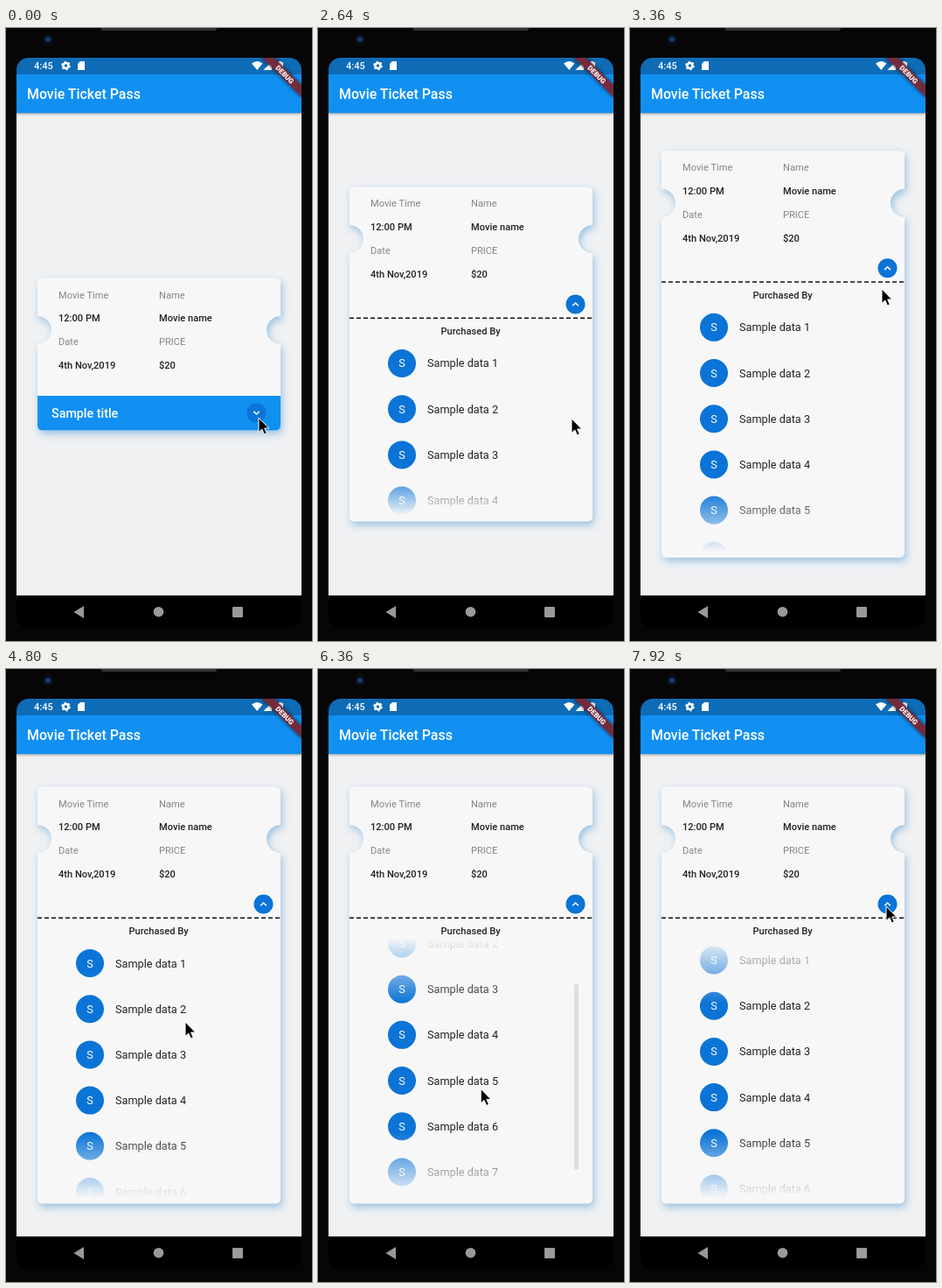
Recreate the animation shown at these times as an HTML page. Size 350 by 700 pixels, loop 8 s.

```html
<!DOCTYPE html>
<html lang="en">
<head>
<meta charset="utf-8">
<title>Movie Ticket Pass</title>
<style>
  html, body { margin: 0; width: 100%; height: 100%; overflow: hidden; background: #060606; }
  svg { display: block; width: 350px; height: 700px; font: 11.1px Roboto, sans-serif; fill: #222; }
  .label { fill: #858585; }
  .strong { font-weight: 500; }
  .white { fill: #fff; }
  .bar { fill: #1190f2; }
  .accent { fill: #0b74d6; }
  .item { font-size: 12.7px; }
  #card { fill: #f7f7f8; filter: drop-shadow(2px 4px 4px #74acdab0); }
</style>
</head>
<body>
<svg viewBox="0 0 350 700">
  <defs>
    <clipPath id="screen"><rect x="12" y="34" width="326" height="651" rx="14"/></clipPath>
    <linearGradient id="fade" x2="0" y2="1">
      <stop id="fadeTop" stop-color="#fff"/>
      <stop offset=".25" stop-color="#fff"/>
      <stop offset=".75" stop-color="#fff"/>
      <stop offset="1" stop-color="#fff" stop-opacity="0"/>
    </linearGradient>
    <mask id="viewport" maskUnits="userSpaceOnUse" x="36" y="0" width="278" height="700">
      <rect id="window" x="36" y="172.5" width="278" fill="url(#fade)"/>
    </mask>
    <g id="toggle">
      <circle class="accent" r="11"/>
      <path d="M-3.3 1.8L0-1.5 3.3 1.8" fill="none" stroke="#fff" stroke-width="1.5"/>
    </g>
  </defs>

  <rect width="350" height="700" fill="#060606"/>
  <rect x="109" y="-2" width="132" height="5" rx="2" fill="#333"/>
  <circle cx="48" cy="13" r="6" fill="#0b1018"/>
  <circle cx="48" cy="13" r="2.8" fill="#16407c"/>

  <g clip-path="url(#screen)">
    <rect x="12" y="34" width="326" height="651" fill="#000"/>
    <rect x="12" y="53" width="326" height="595" fill="#eff1f3"/>
    <rect class="bar" x="12" y="53" width="326" height="44" style="filter:drop-shadow(0 1px 1.5px #0006)"/>
    <rect x="12" y="34" width="326" height="19" fill="#0e6cb7"/>
    <text class="strong white" x="24" y="80.7" font-size="15.9">Movie Ticket Pass</text>

    <g class="white">
      <text class="strong white" x="32" y="47">4:45</text>
      <circle cx="68.5" cy="43" r="3" fill="none" stroke="#fff" stroke-width="2.6"/>
      <circle cx="68.5" cy="43" r="4.6" fill="none" stroke="#fff" stroke-width="1.4" stroke-dasharray="2.4 2.4"/>
      <path d="M85 38H90V48H82V41Z"/>
      <path d="M281 40.5Q287.3 35.5 293.5 40.5L287.3 48Z"/>
      <path d="M304 38.5V48H294.5Z"/>
      <path d="M310 39H312V38H315V39H317V48H310Z"/>
    </g>

    <g transform="translate(338 34) rotate(45)">
      <rect x="-32" y="22.2" width="64" height="9.5" style="filter:drop-shadow(0 0 2.4px #000a)" fill="#762b3c"/>
      <text class="white" y="29.9" font-size="8" font-weight="900" text-anchor="middle">DEBUG</text>
    </g>

    <g id="ticket">
      <path id="card"/>
      <text class="label" x="60" y="23">Movie Time</text>
      <text class="label" x="175" y="23">Name</text>
      <text class="strong" x="60" y="49.7">12:00 PM</text>
      <text class="strong" x="175" y="49.7">Movie name</text>
      <text class="label" x="60" y="76.7">Date</text>
      <text class="label" x="175" y="76.7">PRICE</text>
      <text class="strong" x="60" y="103.5">4th Nov,2019</text>
      <text class="strong" x="175" y="103.5">$20</text>

      <g id="closed">
        <path class="bar" d="M36 134.5H314V168Q314 174 308 174H42Q36 174 36 168Z"/>
        <text class="strong white" x="52" y="159.5" font-size="14.3">Sample title</text>
        <use href="#toggle" transform="translate(286.5 154) rotate(180)"/>
      </g>

      <g id="open">
        <use href="#toggle" x="294.5" y="134"/>
        <path d="M36 149.8H314" stroke="#111" stroke-width="1.5" stroke-dasharray="5 3"/>
        <g mask="url(#viewport)"><g id="list"></g></g>
        <text class="strong" x="174.5" y="168.5" text-anchor="middle">Purchased By</text>
        <rect id="thumb" x="293" width="5" fill="#dedede"/>
      </g>
    </g>

    <g fill="#9a9a9a">
      <path d="M89 660V674L77.5 667Z"/>
      <circle cx="174.5" cy="666.7" r="5.8"/>
      <rect x="259" y="661" width="12" height="12" rx="1"/>
    </g>
  </g>

  <path id="cursor" d="M0 0V16.5L3.8 13 6.4 19 9.2 17.8 6.7 12H11.7Z" fill="#000" stroke="#fff" stroke-width="1"/>
</svg>

<script>
  const LOOP = 8000, STEP = 120;
  const OPEN_AT = 2040, OPEN_TIME = 2370, GROWTH = 151;
  const ITEMS = 8, PITCH = 52.2, LIST_TOP = 172.5;

  // Rows are [time, ...values]
  const cursorPath = [
    [0, 289, 445], [2760, 290, 446], [3360, 288, 298], [3600, 288, 298],
    [4320, 205, 403], [4800, 205, 403], [5400, 200, 290], [5820, 187, 433],
    [7080, 185, 551], [7200, 185, 551], [7920, 293, 271]
  ];
  const scrollPath = [[4800, 0], [5400, 121], [5820, 121], [7080, 3.5]];
  const thumbPath = [[4800, 0], [5040, 1], [7560, 1], [7860, 0]];

  const $ = id => document.getElementById(id);
  const set = (id, attrs) => {
    for (const name in attrs) $(id).setAttribute(name, attrs[name]);
  };

  function sample(path, t) {
    const next = path.findIndex(row => row[0] > t);
    if (next === 0) return path[0].slice(1);
    if (next < 0) return path[path.length - 1].slice(1);
    const a = path[next - 1], b = path[next];
    const u = (t - a[0]) / (b[0] - a[0]), k = u * u * (3 - 2 * u);
    return a.slice(1).map((v, i) => v + (b[i + 1] - v) * k);
  }

  const cardPath = h => `M42 0H308Q314 0 314 6V43.5A16 16 0 0 0 314 75.5V${h - 6}
    Q314 ${h} 308 ${h}H42Q36 ${h} 36 ${h - 6}V75.5A16 16 0 0 0 36 43.5V6Q36 0 42 0Z`;

  $('list').innerHTML = Array.from({ length: ITEMS }, (_, i) => `
    <g class="item" transform="translate(0 ${201.5 + i * PITCH})">
      <circle class="accent" cx="96" r="16"/>
      <text class="white" x="96" y="4.5" text-anchor="middle">S</text>
      <text x="125" y="4.5">Sample data ${i + 1}</text>
    </g>`).join('');

  function draw(t) {
    const isOpen = t >= OPEN_AT;
    const u = Math.min(1, Math.max(0, (t - OPEN_AT) / OPEN_TIME));
    const shift = GROWTH * (1 - (1 - u) ** 4);
    const height = 174 + 2 * shift;
    const view = Math.max(0, height - 6.5 - LIST_TOP);
    const [scroll] = sample(scrollPath, t);
    const content = ITEMS * PITCH;

    set('ticket', { transform: `translate(0 ${285.5 - shift})` });
    set('card', { d: cardPath(height) });
    set('closed', { display: isOpen ? 'none' : 'inline' });
    set('open', { display: isOpen ? 'inline' : 'none' });
    set('window', { height: view });
    set('fadeTop', { 'stop-opacity': scroll > 0 ? 0 : 1 });
    set('list', { transform: `translate(0 ${-scroll})` });
    set('thumb', {
      y: LIST_TOP + scroll / content * view,
      height: view * view / content,
      opacity: sample(thumbPath, t)[0]
    });
    set('cursor', { transform: `translate(${sample(cursorPath, t)})` });
  }

  function tick() {
    const t = performance.now() % LOOP;
    draw(Math.floor(t / STEP) * STEP);
    requestAnimationFrame(tick);
  }
  tick();
</script>
</body>
</html>
```
